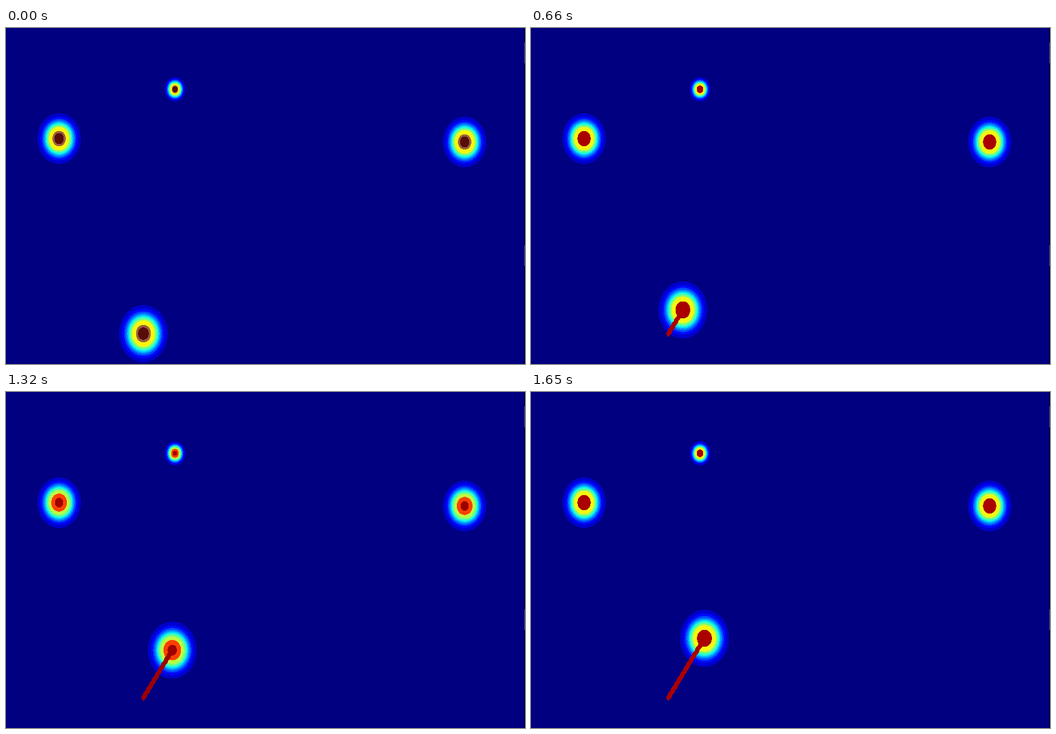
A matplotlib script for the animation above (1.76 s loop, 929 by 603 pixels).

```python
import numpy as np
import matplotlib.pyplot as plt
from matplotlib.animation import FuncAnimation
from matplotlib.patches import Ellipse, Polygon, Rectangle

W, H, DPI = 929, 603, 64
PX = 72 / DPI            # one pixel in points
FRAMES, STEP = 16, 110
ASPECT = 1.17            # blob height over width
LEVELS = 16              # filled contour layers of each Gaussian blob
SPREAD = 530             # r**2 at which a blob falls to 1/e
RING = 9                 # layer of the warm ring around the core

JET = plt.get_cmap("jet")
STILL = [(95, 198.5, 1.0), (821, 204.5, 1.0), (302.5, 110, 0.475)]
MOVER_SCALE = 1.13

# Ring colour, then half width and colour of the rim and of the core
LOOKS = {
    "brown": ("#fbf60c", 11.4, "#9b6040", 8, "#570e0b"),
    "red": ("#f4f812", 11.2, "#aa0000", 11.2, "#aa0000"),
    "orange": ("#bfff40", 13.4, "#ff4000", 6.8, "#9e0000"),
}

fig = plt.figure(figsize=(W / DPI, H / DPI), dpi=DPI, facecolor="#000080")
ax = fig.add_axes([0, 0, 1, 1])
ax.set_xlim(0, W)
ax.set_ylim(H, 0)
ax.axis("off")


def edge_bar(y, height, colour):
    ax.add_patch(Rectangle((W - 1, y), 1, height, fc=colour, lw=0, aa=False))


# Dark right border with two lighter dashes
edge_bar(0, H, "black")
for y in (26, 390):
    edge_bar(y, 37, "#606060")

moving = []


def add(patch):
    patch.set_zorder(2 + len(moving))
    moving.append(ax.add_patch(patch))


def look_at(i):
    if i in (12, 13):
        return LOOKS["orange"]
    return LOOKS["brown" if i < 6 and i % 4 < 2 else "red"]


def layer_radius(k):
    return np.sqrt(-SPREAD * np.log(k / LEVELS))


def draw_blob(x, y, scale, look):
    ring, rim_r, rim, core_r, core = look
    bands = [(layer_radius(k), JET(k / (LEVELS - 1))) for k in range(1, RING)]
    bands += [(layer_radius(RING), ring), (rim_r, rim), (core_r, core)]
    for r, colour in bands:
        width = 2 * r * scale
        add(Ellipse((x, y), width, width * ASPECT, fc=colour, lw=0, aa=False))


def position(t):
    return 246 + 4.3 * t, 548.5 - 7.1 * t


def draw_trail(i, colour):
    t = np.linspace(0, i, 4 * i + 1)
    x, y = position(t)
    line, = ax.plot(x + 0.6 * np.sin(5 * t), y, color=colour, lw=6.6 * PX,
                    aa=False, solid_capstyle="butt", zorder=2 + len(moving))
    moving.append(line)
    x0, y0 = position(0)
    tip = [(x0 - 4, y0), (x0, y0 - 6), (x0 + 4, y0), (x0, y0 + 5)]
    add(Polygon(tip, fc=colour, lw=0, aa=False))


def update(i):
    while moving:
        moving.pop().remove()
    look = look_at(i)
    for x, y, scale in STILL:
        draw_blob(x, y, scale, look)
    draw_blob(*position(i), MOVER_SCALE, look)
    if i:
        draw_trail(i, look[-1])
    return moving


anim = FuncAnimation(fig, update, frames=FRAMES, init_func=lambda: [],
                     interval=STEP, repeat=True, repeat_delay=0)
plt.show()
```
